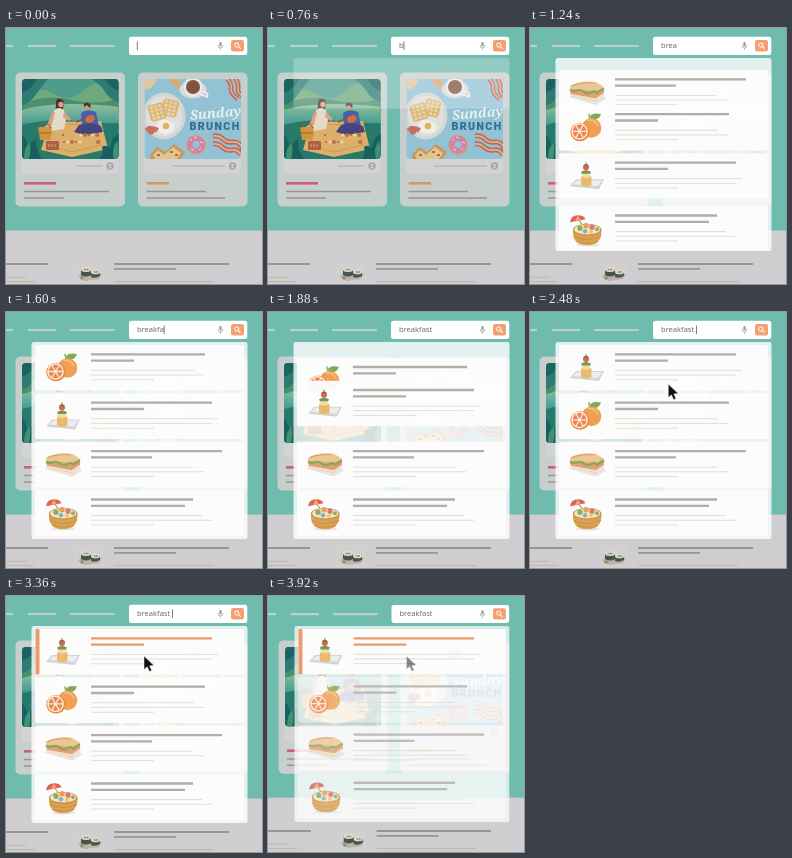
An HTML page that plays this animation: 256x256 px, repeating every 3.96 s.

```html
<!DOCTYPE html>
<html lang="en">
<head>
<meta charset="utf-8">
<title>Recipe search</title>
<style>
html, body { margin: 0; width: 100%; height: 100%; overflow: hidden; background: #6fbbae; }
svg { display: block; width: 100vw; height: 100vh; }
#query { font: 7.6px "Open Sans", sans-serif; fill: #626262; white-space: pre; }
#script { font: italic 600 13.4px "Noto Serif", serif; fill: #e9f0f2; }
#block { font: 800 10.6px "Roboto", sans-serif; letter-spacing: 1.4px; fill: #2f6c93; }
</style>
</head>
<body>
<svg viewBox="0 0 256 256" xmlns="http://www.w3.org/2000/svg">
  <defs>
    <clipPath id="picA"><rect x="16" y="51" width="96.500" height="80" rx="4"/></clipPath>
    <clipPath id="picB"><rect x="138.500" y="51" width="96.500" height="80" rx="4"/></clipPath>
    <clipPath id="grow"><rect id="growBox" x="25" y="29.500" width="217" height="198"/></clipPath>
    <linearGradient id="lake" x2="0" y2="1">
      <stop offset="0" stop-color="#8fc09a"/><stop offset=".5" stop-color="#4c9f96"/><stop offset="1" stop-color="#1f7478"/>
    </linearGradient>
  </defs>

  <g id="stage">
    <rect x="-9" y="-9" width="280" height="212" fill="#6fbbae"/>
    <rect x="-9" y="202.500" width="280" height="70" fill="#cfcdd0"/>
    <g id="cards"></g>
    <g id="bars"></g>

    <g clip-path="url(#picA)">
      <rect x="16" y="51" width="97" height="80" fill="#4f9c8d"/>
      <path d="M16 70Q32 56 48 66T78 62T113 64V100H16Z" fill="#6fa97c"/>
      <path d="M16 76Q40 66 66 72T113 70V84H16Z" fill="#4b8f6d"/>
      <path d="M16 82Q50 72 113 79V112H16Z" fill="url(#lake)"/>
      <path d="M16 51H42Q36 58 31 65Q25 75 16 77ZM113 51H86Q95 57 99 64Q105 73 113 74Z" fill="#2c7c74"/>
      <path d="M16 51H31Q27 60 16 65ZM113 51H99Q102 59 113 63Z" fill="#1b6263"/>
      <path d="M16 97Q44 90 70 93T113 95V131H16Z" fill="#257a6a"/>
      <path d="M43 94L95 93L102 121L66 129L35 122Z" fill="#dcb06b"/>
      <path d="M48 97L91 96L95 117L66 124L42 118Z" fill="none" stroke="#c58f58" stroke-width=".7"/>
      <path d="M50 76Q50 69 55 71Q60 73 57 80L56 88H49Z" fill="#4a2f33"/>
      <circle cx="55" cy="76.500" r="2.700" fill="#dda084"/>
      <path d="M48 82Q53 78 58 82L60 92L58 101L45 103L38 99L46 94Z" fill="#e3dbc6"/>
      <path d="M46 85L49 84L46 97L41 104L39 102ZM58 84L65 91L63 93L57 89Z" fill="#dda084"/>
      <circle cx="81" cy="79" r="3" fill="#d29472"/>
      <path d="M78 79Q77 74 82 75Q86 76 84 80L81 77Z" fill="#43303c"/>
      <path d="M75 85Q81 80 90 84L93 98H76Z" fill="#4560ad"/>
      <path d="M73 97Q84 93 95 98L97 104L78 107L68 104Z" fill="#45457f"/>
      <path d="M70 94L84 88" stroke="#944d38" stroke-width="1.500"/>
      <ellipse cx="84" cy="91" rx="5" ry="3.700" transform="rotate(-25 84 91)" fill="#cf6f3e"/>
      <path d="M32 99H46L44 112H34Z" fill="#d2953f"/>
      <path d="M33 100Q39 88 45 100M33 105H45" fill="none" stroke="#95602e"/>
      <rect x="40" y="113" width="13" height="9" rx="1" fill="#ae6047"/>
      <path d="M43 116V119M46 116V119M49 116V119" stroke="#e4bb83" stroke-width=".8"/>
      <g id="snacks"></g>
      <path d="M16 131V106Q21 112 22 121Q25 113 30 111Q30 123 36 131ZM113 131V105Q105 110 104 120Q99 116 96 119Q98 126 94 131Z" fill="#17605f"/>
      <path d="M18 131Q18 118 24 115Q25 124 23 131ZM108 131Q105 120 111 113Q114 124 111 131Z" fill="#3f9270"/>
    </g>

    <g clip-path="url(#picB)">
      <rect x="138" y="51" width="98" height="80" fill="#93c2d5"/>
      <path d="M138 51H150Q150 60 138 62Z" fill="#dfc69d"/>
      <path d="M163 51Q166 57 173 61Q176 57 172 51Z" fill="#dfa961"/>
      <ellipse cx="158" cy="88" rx="21.500" ry="23.500" fill="#d4d6d6"/>
      <ellipse cx="158" cy="88" rx="18" ry="20" fill="#e0dfdc"/>
      <g id="waffles"></g>
      <path d="M152 94Q158 89 164 94Q172 96 167 103Q160 109 154 104Q147 100 152 94Z" fill="#efedea"/>
      <circle cx="160" cy="98" r="3.300" fill="#e4b25c"/>
      <path d="M139 101Q143 95 149 100Q150 106 144 107ZM147 98L153 100L150 105Z" fill="#cb6e5d"/>
      <ellipse cx="187" cy="61.500" rx="13.500" ry="9" fill="#d6dadc"/>
      <circle cx="187" cy="59" r="9.500" fill="#ebe8e6"/>
      <circle cx="187" cy="59" r="7" fill="#80543f"/>
      <path d="M195 63Q203 64 201 69L194 66" fill="none" stroke="#ebe8e6" stroke-width="2"/>
      <g id="bacon" fill="none">
        <path d="M221 51Q226 55 225 60T232 71M229 50Q233 55 232 60T238 69" stroke="#bd6a58" stroke-width="4.500"/>
        <path d="M221 51Q226 55 225 60T232 71M229 50Q233 55 232 60T238 69" stroke="#dfb593" stroke-width="1.500"/>
      </g>
      <use href="#bacon" transform="translate(-16 317) rotate(-48 228 60) translate(51 -251)" visibility="hidden"/>
      <path d="M207 108Q213 107 217 111T227 114T237 121M207 116Q212 115 216 119T226 122T235 127" fill="none" stroke="#bd6a58" stroke-width="5"/>
      <path d="M207 108Q213 107 217 111T227 114T237 121M207 116Q212 115 216 119T226 122T235 127" fill="none" stroke="#dfb593" stroke-width="1.700"/>
      <circle cx="190" cy="117" r="10" fill="#cda56d"/>
      <circle cx="190" cy="116.500" r="8.800" fill="#d283ab"/>
      <circle cx="190" cy="116.500" r="3.400" fill="#93c2d5"/>
      <path d="M184 113L186 111M188 109L191 110M194 114L197 115M195 120L193 122M185 121L188 122" stroke="#f0d6bd"/>
      <path d="M144 127L151 119L159 124L168 116L179 124L174 132H145Z" fill="#c8985a"/>
      <path d="M147 127L152 122L158 127L167 119L175 125L171 131H149Z" fill="#e2c48c"/>
      <path d="M151 127h3M164 124h3M169 127h3" stroke="#ad6a4f" stroke-width="2"/>
      <text id="script" x="184.500" y="92" transform="rotate(-5 184.500 92)">Sunday</text>
      <text id="block" x="183.500" y="101.700">BRUNCH</text>
    </g>

    <g>
      <rect x="68" y="232" width="30" height="27" rx="2" fill="#d1cfcf"/>
      <path d="M72 249L78 242L96 246L93 251L79 253Z" fill="#b9b4aa"/>
      <path d="M75 241.500V247Q80 250 85 247V241.500ZM85 244V249Q89 251 94 248V244Z" fill="#46564c"/>
      <ellipse cx="80" cy="241.500" rx="5" ry="2.500" fill="#dedcd2"/>
      <ellipse cx="89.500" cy="244" rx="4.500" ry="2.300" fill="#dedcd2"/>
      <path d="M77.500 241.500h2.500M87.500 244h2.500" stroke="#c58a70" stroke-width="1.700"/>
      <path d="M80 241.500h2.500M90 244h2" stroke="#7d9a6a" stroke-width="1.700"/>
      <circle cx="76" cy="250" r="1.700" fill="#84985f"/>
    </g>

    <rect x="123" y="8.800" width="118.300" height="18.200" rx="2.500" fill="#fff"/>
    <text id="query" x="131" y="20"></text>
    <path id="caret" d="M0 13.500V22" stroke="#555" stroke-width=".8"/>
    <rect x="213.400" y="14" width="2.200" height="4.600" rx="1.100" fill="#999"/>
    <path d="M212 17Q212 20 214.500 20T217 17M214.500 20V21.800" fill="none" stroke="#999" stroke-width=".7"/>
    <rect x="225" y="12" width="13" height="11.500" rx="2" fill="#f2a272"/>
    <circle cx="230.800" cy="17" r="2.100" fill="none" stroke="#fff"/>
    <path d="M232.400 18.600L234.500 20.700" stroke="#fff" stroke-width="1.100"/>

    <g id="panel" clip-path="url(#grow)">
      <rect id="sheet" x="25.500" y="30" width="216" height="197" rx="2.500" fill="#fff"/>
      <g id="rows"></g>
    </g>
    <path id="cursor" d="M0 0V13.500L3.200 10.800L5.400 15.600L7.800 14.500L5.600 9.900L10 9.500Z" fill="#111" stroke="#fff" stroke-width=".5"/>
  </g>
</svg>

<script>
const LOOP = 3960;
const $ = id => document.getElementById(id);
const clamp = x => Math.max(0, Math.min(1, x));
const span = (t, a, b) => clamp((t - a) / (b - a));
const smooth = x => x * x * (3 - 2 * x);
const easeOut = x => 1 - (1 - x) ** 3;
const mix = (a, b, p) => a + (b - a) * p;
const bar = (x1, x2, y, w, color, cls = '') =>
  `<path class="${cls}" d="M${x1} ${y}H${x2}" stroke="${color}" stroke-width="${w}"/>`;

// Page furniture
const GRAY = '#98968e', TAN = '#bdb8a8', PALE = '#dedbcf';
const card = (x, accent, end, l1, l2, from) => `
  <rect x="${x}" y="44.500" width="109.500" height="134" rx="5" fill="#c7cfcc"/>
  <rect x="${x + 6}" y="51" width="97" height="94.500" rx="4" fill="#d3d2d4"/>
  ${bar(from, x + 87, 138, 1, '#aeaca7')}
  <circle cx="${x + 94.5}" cy="138" r="3.700" fill="#a9a7a1"/>
  <circle cx="${x + 94.5}" cy="137" r="1.300" fill="#d5d4d2"/>
  <path d="M${x + 92.3} 140.300q2.200-3 4.400 0z" fill="#d5d4d2"/>
  ${bar(x + 8.5, end, 155.3, 2.6, accent)}
  ${bar(x + 8.5, l1, 163.6, 1.5, GRAY)}
  ${bar(x + 8.5, l2, 170, 1.5, GRAY)}`;
$('cards').innerHTML = card(9.5, '#cf5c86', 50, 103, 58, 70) + card(132, '#d39a5c', 163, 200, 219, 166);
$('bars').innerHTML =
  [[-9, 7], [22, 50], [64, 109]].map(([a, b]) => bar(a, b, 18, 2.2, '#b9d0cb')).join('') +
  bar(-9, 42, 236, 1.8, GRAY) + bar(-9, 20, 249.3, 1, TAN) + bar(-9, 28, 253.5, 1, TAN) +
  bar(108, 223, 236, 1.8, GRAY) + bar(108, 170, 240.8, 1.8, GRAY) + bar(108, 208, 253.5, 1, TAN);

const dot = (x, y, r, c) => `<circle cx="${x}" cy="${y}" r="${r}" fill="${c}"/>`;
$('snacks').innerHTML = Array.from({ length: 12 }, (_, i) =>
  dot(57 + i * 17 % 38, 107 + i * 7 % 14, 1 + i % 3 * .5, ['#bb5548', '#ead9ad', '#b5743f'][i % 3])).join('');

const waffle = (x, y, a) => {
  let s = `<g transform="translate(${x} ${y}) rotate(${a})"><rect x="-8" y="-8.500" width="16" height="17" rx="3" fill="#d9b577"/>`;
  for (let i = 0; i < 12; i++)
    s += `<rect x="${-6 + i % 3 * 4.4}" y="${-7 + (i / 3 | 0) * 3.8}" width="3" height="2.600" fill="#e9d3a4"/>`;
  return s + '</g>';
};
$('waffles').innerHTML = waffle(164, 80, 14) + waffle(151, 84, -16);

// Search results, drawn relative to the row's top edge
const icons = {
  sandwich: `
    <path d="M39 27L66 35L76 29L70 22L44 21Z" fill="#e6e5e4"/>
    <path d="M40 18L68 14L74 18V23L66 31L41 26Z" fill="#dda565"/>
    <path d="M40 16Q50 10 66 12L74 17L66 21L41 19Z" fill="#ecc794"/>
    <path d="M41 16Q51 12 64 13" fill="none" stroke="#d89f5d"/>
    <path d="M40 20Q43 22 47 20.500T54 22T61 22.500T67 23L74 18.500" fill="none" stroke="#84a75c" stroke-width="2"/>
    <path d="M42 23L66 26.500L74 21.500" fill="none" stroke="#e39a83" stroke-width="1.700"/>
    <path d="M41 25L66 29.500L74 24" fill="none" stroke="#f3e3c4" stroke-width="2.200"/>`,
  orange: `
    <path d="M59 13Q61 7 71 9Q69 16 60 15Z" fill="#7fab55"/>
    <path d="M60 14Q57 10 59 8L62 14Z" fill="#94b869"/>
    <circle cx="61.500" cy="23" r="9.800" fill="#f0a052"/>
    <path d="M58 15.500Q65 14 68 21" fill="none" stroke="#f6bd7c" stroke-width="1.700"/>
    <ellipse cx="50" cy="27" rx="9.700" ry="9.300" fill="#e98a45"/>
    <ellipse cx="49.500" cy="26.500" rx="8.300" ry="8.300" fill="#fae8d2"/>
    <ellipse cx="49.500" cy="26.500" rx="6.800" ry="6.800" fill="#ea8450"/>
    <path d="M42 26.500H57M45.700 20L53.300 33M53.300 20L45.700 33" stroke="#fae8d2" stroke-width="1.300"/>
    <circle cx="49.500" cy="26.500" r="1.700" fill="#fae8d2"/>`,
  skewer: `
    <path d="M46 26H74L69 36L40 33Z" fill="#d3d4d6"/>
    <path d="M47.500 27H72L68 33L43 31Z" fill="#ededed"/>
    <path d="M56 9V29" stroke="#a57549"/>
    <path d="M51 23.500L56 22L61.500 23.500V32L56 33.500L51 32Z" fill="#eaba6c"/>
    <path d="M51 23.500L56 25L61.500 23.500L56 22Z" fill="#f5d798"/>
    <rect x="51.500" y="19.500" width="9" height="3" rx="1.300" fill="#f0ddb0"/>
    <path d="M51 18.500Q56 15.500 61 18.500L60 20.500H52Z" fill="#6d9b55"/>
    <circle cx="56" cy="14" r="3" fill="#d9634f"/>
    <path d="M53 12.500Q56 9 59 12.500Z" fill="#567f4d"/>`,
  bowl: `
    <path d="M48 13L55 22" stroke="#a87851"/>
    <path d="M40 16Q41 9 48 9Q54 9 55.500 13Z" fill="#dc6355"/>
    <path d="M45 14.500L48 9L50.500 14Z" fill="#efab6c"/>
    <ellipse cx="57.500" cy="38.500" rx="12" ry="1.800" fill="#e8e6e2"/>
    <path d="M43 24Q42 39 57 39T71.500 24Z" fill="#dba153"/>
    <path d="M44 30Q57 37 71 30M47 35Q57 39 68 35" fill="none" stroke="#c58b45" stroke-width=".8"/>
    <ellipse cx="57.200" cy="23.500" rx="14.300" ry="6" fill="#c98f4a"/>
    <ellipse cx="57.200" cy="23.300" rx="13" ry="5" fill="#f3e6c8"/>
    ${dot(50, 22, 2.6, '#86ad5e')}${dot(56, 19.5, 2.7, '#e8a052')}${dot(62, 21, 2.6, '#da7777')}
    ${dot(67, 23, 2, '#8bb164')}${dot(55, 25, 2.2, '#85b3bd')}${dot(61, 25.5, 2, '#efc766')}`
};
const ends = {
  sandwich: [216, 146, 187, 198, 148],
  orange: [199, 128, 188, 198, 148],
  skewer: [206, 138, 212, 206, 148],
  bowl: [187, 179, 196, 206, 148]
};
const lineY = [9.3, 15.6, 25.4, 30, 34.8];
const makeRow = name => `
  <g id="${name}">
    <rect class="back" x="29" width="209" height="45.500" rx="1.500" fill="#fdfdfd"/>
    <g class="body">${icons[name]}${ends[name].map((x, i) =>
      bar(85, x, lineY[i], i < 2 ? 2.3 : .9, i < 2 ? '#b0aea6' : PALE, i < 2 ? 'head' : '')).join('')}</g>
    <rect class="mark" x="29.500" width="4" height="45.500" rx="1" fill="#ec9a68" opacity="0"/>
  </g>`;
const names = ['sandwich', 'orange', 'skewer', 'bowl'];
$('rows').innerHTML = names.map(makeRow).join('');
const part = (name, cls) => $(name).querySelector(cls);
const heads = $('skewer').querySelectorAll('.head');

const typed = [640, 840, 1000, 1140, 1300, 1420, 1540, 1680, 1800, 1920];
const WORD = 'breakfast ';

function draw(t) {
  const out = span(t, 3760, 4080);
  const k = 1 - .01 * out;
  $('stage').setAttribute('transform', `translate(${220 * (1 - k)} ${40 * (1 - k)}) scale(${k})`);

  const query = $('query');
  const text = WORD.slice(0, typed.filter(x => t >= x).length);
  if (query.textContent !== text) query.textContent = text;
  const width = text ? query.getComputedTextLength() : 0;
  $('caret').setAttribute('transform', `translate(${131.3 + width} 0)`);
  $('caret').setAttribute('opacity', Math.cos(t / 830 * 2 * Math.PI) > 0 ? 1 : 0);

  // The sheet unrolls downwards while it fades in
  const height = mix(50, 197, easeOut(span(t, 760, 1445)));
  $('panel').setAttribute('opacity', span(t, 670, 970));
  $('growBox').setAttribute('height', height + .5);
  $('sheet').setAttribute('height', height);
  $('sheet').setAttribute('opacity', mix(.8, .62, out));

  // Two reshuffles: the first row drops to third, then the top pair swaps
  const a = smooth(span(t, 1160, 1590)), b = smooth(span(t, 1740, 2160));
  const slot = { sandwich: 2 * a, orange: 1 - a + b, skewer: 2 - a - b, bowl: 3 };
  names.forEach((n, i) => {
    const fade = n === 'skewer' ? 0 : out;
    const from = 740 + i * 60;
    $(n).setAttribute('transform', `translate(0 ${33 + 48.4 * slot[n]})`);
    $(n).setAttribute('opacity', span(t, from, from + 180));
    part(n, '.back').setAttribute('opacity', mix(.95, -.05, fade));
    part(n, '.body').setAttribute('opacity', span(t, from + 40, from + 180) * (1 - .4 * fade));
  });

  const hover = span(t, 2640, 2760);
  part('skewer', '.mark').setAttribute('opacity', hover);
  const tint = [[176, 236], [174, 154], [166, 104]].map(([p, q]) => Math.round(mix(p, q, hover)));
  heads.forEach(h => h.setAttribute('stroke', `rgb(${tint})`));

  const rest = 1 - easeOut(span(t, 2140, 2700));
  $('cursor').setAttribute('transform', `translate(${138 + 4 * rest} ${60 + 202 * rest})`);
  $('cursor').setAttribute('opacity', t < 2140 ? 0 : 1 - out);
}

const start = performance.now();
function tick() {
  draw((performance.now() - start) % LOOP);
  requestAnimationFrame(tick);
}
draw(0);
requestAnimationFrame(tick);
</script>
</body>
</html>
```
